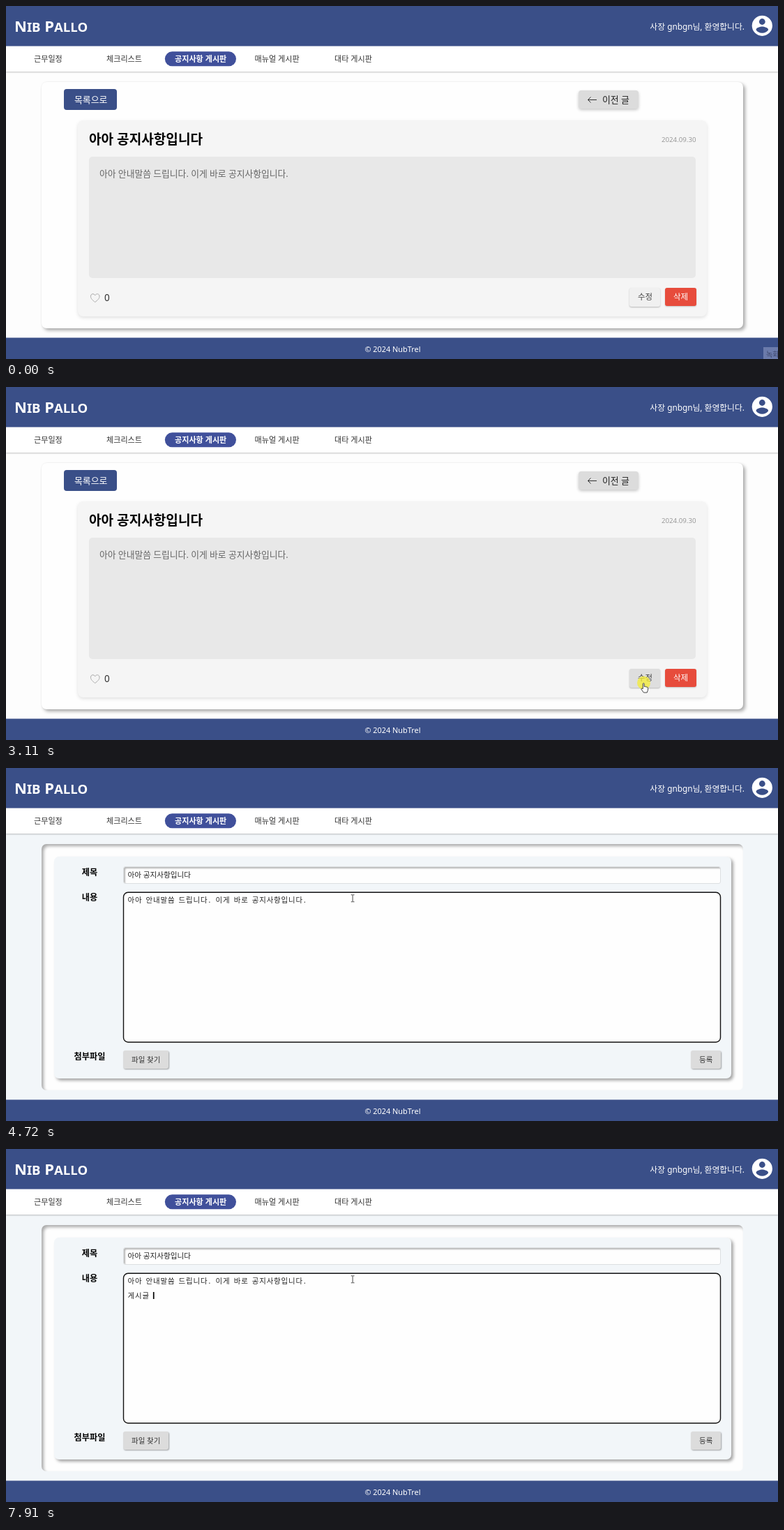
Recreate the animation shown at these times as an HTML page. Size 1107 px wide and 506 px high, loop 8000 ms.

```html
<!DOCTYPE html>
<html lang="ko">
<head>
<meta charset="utf-8">
<title>공지사항 게시판</title>
<style>
  html, body { margin: 0; width: 100%; height: 100%; overflow: hidden; }
  #stage { position: absolute; left: 0; top: 0; width: 1107px; height: 506px; overflow: hidden; background: #fdfdfd; }
  #stage.form { background: #f2f6f9; }
  #stage div { position: absolute; box-sizing: border-box; }
  svg { position: absolute; left: 0; top: 0; width: 1107px; height: 506px;
    font-family: "Noto Sans", "Noto Sans CJK KR", sans-serif; }
  .view { left: 0; top: 0; width: 1107px; height: 506px; }
  #nav { left: 0; top: 57px; width: 1107px; height: 37px; background: #fff; box-shadow: 0 1px 2px rgba(0,0,0,.25); }
  .panel { left: 51px; top: 109px; width: 1006px; height: 353px; border-radius: 7px; background: #fefefe; }
  #read .panel { box-shadow: 3px 3px 5px rgba(0,0,0,.33), 0 0 2px rgba(0,0,0,.08); }
  #write .panel { box-shadow: inset 3px 3px 4px rgba(0,0,0,.33); }
  .btn { border-radius: 3px; background: #dcdcdc; box-shadow: 1px 1px 2px rgba(0,0,0,.35); }
  #list { left: 83px; top: 119px; width: 76px; height: 30px; border-radius: 4px; background: #3a4f88; }
  #prev { left: 821px; top: 121px; width: 86px; height: 26px; border-radius: 4px; box-shadow: 0 2px 4px rgba(0,0,0,.22); }
  #card { left: 103px; top: 164px; width: 902px; height: 281px; border-radius: 8px; background: #f5f5f5; box-shadow: 0 2px 5px rgba(0,0,0,.12); }
  #body { left: 119px; top: 216px; width: 870px; height: 174px; border-radius: 5px; background: #e8e8e8; }
  #edit { left: 894px; top: 404px; width: 44px; height: 27px; background: #f0f0f0; box-shadow: 0 1px 2px rgba(0,0,0,.25); }
  #edit.over { background: #dedede; }
  #del { left: 945px; top: 404px; width: 45px; height: 26px; background: #e74c3c; box-shadow: 0 1px 2px rgba(0,0,0,.2); }
  #sheet { left: 69px; top: 127px; width: 971px; height: 318px; border-radius: 7px; background: #f2f6f9; box-shadow: 3px 3px 4px rgba(0,0,0,.35); }
  .field { left: 168px; width: 857px; background: #fefefe; border: 1px solid #dcdfe1; box-shadow: inset 2px 2px 2px rgba(0,0,0,.27); }
  #subject { top: 141px; height: 25px; border-radius: 3px; }
  #area { top: 178px; height: 216px; border-radius: 7px; }
  #area.focus { border-color: transparent; box-shadow: none; }
  #file { left: 168px; top: 405px; width: 65px; height: 26px; }
  #save { left: 982px; top: 405px; width: 43px; height: 26px; }
  #badge { left: 1086px; top: 489px; width: 21px; height: 17px; background: #6b7bab; }
  .nav { font-size: 11.1px; fill: #333; }
  .label { font-size: 12.2px; font-weight: 700; text-anchor: middle; }
  .mono { font: 10.45px "Noto Sans Mono CJK KR", "Noto Sans CJK KR", monospace; fill: #222;
    white-space: pre; letter-spacing: .08em; word-spacing: -.08em; }
  .logo { font: 700 22px "Noto Sans", "Open Sans", sans-serif; }
  .white { fill: #fff; }
  .blue { fill: #3a4f88; }
</style>
</head>
<body>
<div id="stage">
  <div class="view" id="read">
    <div class="panel"></div>
    <div id="list"></div>
    <div class="btn" id="prev"></div>
    <div id="card"></div>
    <div id="body"></div>
    <div class="btn" id="edit"></div>
    <div class="btn" id="del"></div>
    <svg>
      <text x="98" y="139" font-size="12.9" class="white">목록으로</text>
      <path d="M847 134.5H834.5M838.5 130.5L834.5 134.5L838.5 138.5" fill="none" stroke="#333"/>
      <text x="855" y="139" font-size="12.9" fill="#222">이전 글</text>
      <text x="119" y="197.5" font-size="19.1" font-weight="700">아아 공지사항입니다</text>
      <text x="989.5" y="194.5" font-size="9.7" fill="#999" text-anchor="end">2024.09.30</text>
      <text x="134" y="244.5" font-size="12.8" fill="#666">아아 안내말씀 드립니다. 이게 바로 공지사항입니다.</text>
      <path d="M127.7 424.5C124 421.5 121.5 419.5 121.5 416.2C121.5 412.2 126 411.6 127.7 414.8C129.4 411.6 134 412.2 134 416.2C134 419.5 131.4 421.5 127.7 424.5Z" fill="none" stroke="#aaa"/>
      <text x="141" y="423" font-size="13.5" fill="#333">0</text>
      <text x="906" y="421" font-size="11.4" fill="#444">수정</text>
      <text x="957" y="421" font-size="11.4" class="white">삭제</text>
    </svg>
  </div>

  <div class="view" id="write">
    <div class="panel"></div>
    <div id="sheet"></div>
    <div class="field" id="subject"></div>
    <div class="field" id="area"></div>
    <div class="btn" id="file"></div>
    <div class="btn" id="save"></div>
    <svg>
      <rect id="ring" x="168.5" y="178.3" width="856" height="214.7" rx="6.5" fill="none" stroke="#111" stroke-width="1.4"/>
      <g class="label">
        <text x="120" y="153.5">제목</text>
        <text x="120" y="189.5">내용</text>
        <text x="120" y="417.5">첨부파일</text>
      </g>
      <g font-size="10.5" fill="#333">
        <text x="180" y="421.5">파일 찾기</text>
        <text x="994" y="421.5">등록</text>
      </g>
      <g id="loaded">
        <text x="174.5" y="157" font-size="10.6" fill="#222">아아 공지사항입니다</text>
        <text class="mono" x="174.5" y="192.5">아아 안내말씀 드립니다. 이게 바로 공지사항입니다.</text>
      </g>
      <text class="mono" id="typed" x="174.5" y="213.5"></text>
      <rect id="caret" width="1.7" height="10"/>
    </svg>
  </div>

  <div id="nav"></div>
  <svg>
    <path class="blue" d="M0 0H1107V57.6H0ZM0 475.6H1107V506H0Z"/>
    <rect x="227.8" y="65.3" width="102.2" height="21" rx="10.5" fill="#40509b"/>
    <text class="logo white" x="12" y="37">N<tspan font-size="18.5">IB</tspan> P<tspan font-size="18.5">ALLO</tspan></text>
    <text x="1059" y="33.5" font-size="11.8" text-anchor="end" class="white">사장 gnbgn님, 환영합니다.</text>
    <circle cx="1084.3" cy="28.3" r="14.6" class="white"/>
    <g class="blue">
      <circle cx="1084.3" cy="22.5" r="4.4"/>
      <path d="M1075.5 34.2C1075.6 31.2 1081.4 29.6 1084.3 29.6S1093 31.2 1093.1 34.2C1091.2 37 1088 38.8 1084.3 38.8S1077.4 37 1075.5 34.2Z"/>
    </g>
    <g class="nav">
      <text x="40" y="79.5">근무일정</text>
      <text x="144" y="79.5">체크리스트</text>
      <text x="242" y="79.5" font-weight="700" class="white">공지사항 게시판</text>
      <text x="356.5" y="79.5">매뉴얼 게시판</text>
      <text x="471" y="79.5">대타 게시판</text>
    </g>
    <text x="554.5" y="496" font-size="10.9" text-anchor="middle" class="white">© 2024 NubTrel</text>
  </svg>
  <div id="badge"></div>
  <svg>
    <text id="badgeText" x="1090" y="502.5" font-size="10" fill="#3b4468">녹화</text>
    <circle id="glow" r="9.5" fill="#f4ec32" opacity=".75"/>
    <g id="pointer" stroke="#333" stroke-width=".9" fill="#fff" stroke-linejoin="round">
      <path id="arrow" d="M.5 .5V10L2.7 8L4.3 11.3L5.8 10.6L4.3 7.5H6.9Z"/>
      <path id="hand" d="M3.3 9V1.7Q4.3 .3 5.2 1.7V6Q6.4 5.2 7.2 6.3Q8.3 5.7 8.9 6.8Q10.3 6.4 10.5 8V10.7L9.2 14.5H4.4L.8 9.6Q1 7.8 3.3 9Z"/>
      <path id="beam" d="M.5 .5H2.2L2.8 1L3.4 .5H5.2M2.8 1V10M.5 10.5H2.2L2.8 10L3.4 10.5H5.2" fill="none"/>
    </g>
  </svg>
</div>
<script>
  const $ = id => document.getElementById(id);
  const LOOP = 8000, STEP = 68.7, CELL = 10.45, LEFT = 174.3;

  // pointer moves: start time, number of steps, end x, end y
  const moves = [
    [720, 4, 1053, 166], [1330, 3, 423, 192], [1870, 9, 910, 429],
    [2690, 2, 910, 423.5], [3170, 1, 914, 424], [3630, 7, 529, 184],
    [4450, 2, 491, 182], [4660, 1, 494.3, 181.3]
  ];
  // caret: time, column in half cells (-1 hides it), top
  const carets = [
    [0, -1], [4190, 49, 184], [4720, -1], [5250, 49, 184], [5320, 0, 194], [5850, -1],
    [6180, 0, 205], [6710, -1], [7240, 2, 205], [7510, 4, 205], [7770, 6, 205], [7910, 7, 205]
  ];
  const typing = [[0, ''], [7240, 'ㄱ'], [7310, '게'], [7440, '겟'], [7510, '게시'],
    [7710, '게식'], [7770, '게시글'], [7910, '게시글 ']];

  const latest = (list, t) => list.filter(e => e[0] <= t).pop();
  const show = (id, on) => { $(id).style.display = on ? '' : 'none'; };

  function pointerAt(t) {
    let x = 1079, y = 168;
    for (const [start, n, toX, toY] of moves) {
      if (t < start) break;
      const k = Math.min(1, (Math.floor((t - start) / STEP + .03) + 1) / n);
      const e = k * k * (3 - 2 * k);
      x += (toX - x) * e;
      y += (toY - y) * e;
    }
    return [x, y];
  }

  function draw(t) {
    const form = t >= 3170, focus = t >= 4190;
    $('stage').className = form ? 'form' : '';
    show('read', !form);
    show('write', form);
    show('badge', t < 70);
    show('badgeText', t < 70);
    show('loaded', t >= 3300);
    show('ring', focus);
    $('area').classList.toggle('focus', focus);

    const [x, y] = pointerAt(t);
    const over = !form && x > 890 && x < 938 && y > 402 && y < 431;
    const inArea = form && y < 392;
    show('pointer', t >= 720);
    $('pointer').setAttribute('transform', `translate(${x} ${y})`);
    show('hand', over);
    show('beam', inArea);
    show('arrow', !over && !inArea);
    $('edit').classList.toggle('over', over);

    show('glow', (t >= 3110 && t < 3170) || (focus && t < 4310));
    $('glow').setAttribute('cx', x + (form ? 2.8 : 4.5));
    $('glow').setAttribute('cy', y + (form ? 5.5 : .5));

    const [, col, top] = latest(carets, t);
    show('caret', col >= 0);
    if (col >= 0) {
      $('caret').setAttribute('x', LEFT + col * CELL / 2);
      $('caret').setAttribute('y', top);
    }
    $('typed').textContent = latest(typing, t)[1];
  }

  function frame() {
    draw(performance.now() % LOOP);
    requestAnimationFrame(frame);
  }
  frame();
</script>
</body>
</html>
```
